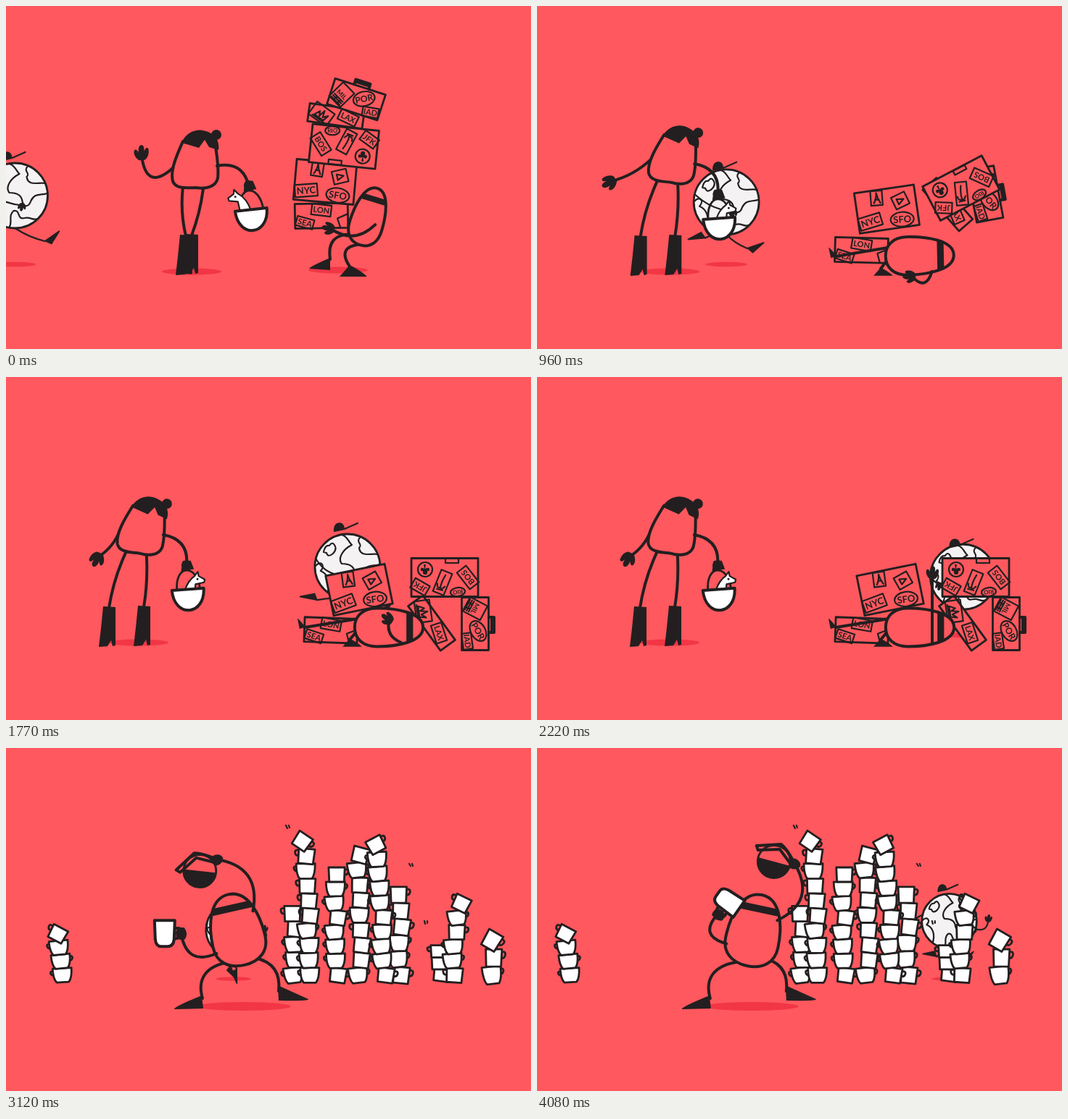
Recreate the animation shown at these times as an HTML page. Size 724x474 px, loop 4110 ms.

```html
<!DOCTYPE html>
<html lang="en">
<head>
<meta charset="utf-8">
<title>Running globe</title>
<style>
  html, body { margin: 0; width: 100%; height: 100%; overflow: hidden; background: #ff585e; }
  svg { display: block; width: 100%; height: 100%; }
  path, circle, rect { vector-effect: non-scaling-stroke; }
  .line { fill: none; stroke: #231f20; stroke-width: 4; stroke-linecap: round; stroke-linejoin: round; }
  .thin { stroke-width: 2.2; }
  .mid { stroke-width: 2.8; }
  .skin { fill: #ff585e; }
  .white { fill: #fff; }
  .ink { fill: #231f20; }
  .shadow { fill: #f23645; }
  text { font: 700 11px Lato, "Open Sans", sans-serif; fill: #231f20; text-anchor: middle; }
</style>
</head>
<body>
<svg viewBox="0 0 724 474" preserveAspectRatio="none">
  <defs>
    <path id="wave" class="ink" d="M-4,6C-9,2 -12,-5 -9,-9Q-6,-10 -4,-5Q-4,-15 1,-15Q5,-14 4,-6Q7,-13 10,-9C11,-2 8,4 4,6Z"/>
    <path id="boot" class="ink" d="M-8,-2L9,-1L9,52L5,53L3,45L-2,53L-14,54L-11,28Z"/>
    <path id="shoe" class="ink" d="M-1,-1L24,-1Q26,0 24,1L5,9Z"/>
    <g id="body">
      <path class="line skin" d="M0,-41C18,-41 23,-8 23,14C23,31 14,41 0,41C-14,41 -23,31 -23,14C-23,-8 -18,-41 0,-41Z"/>
      <path class="ink" d="M-16,-29L16,-29L18,-21L-18,-21Z"/>
    </g>
    <g id="mug">
      <path class="line mid" d="M11,-8q7,-2 6,4q-1,5 -6,4"/>
      <path class="line mid white" d="M-12,-12L12,-12L11,12L-11,12Z"/>
    </g>
    <g id="bowl">
      <path class="line mid" d="M13,-8q6,0 4,5q-2,4 -6,3"/>
      <path class="line mid white" d="M-14,-12L14,-12Q14,6 9,12L-9,12Q-14,6 -14,-12Z"/>
    </g>
  </defs>

  <g id="globe">
    <ellipse class="shadow" rx="29" ry="3.2"/>
    <g id="planet">
      <path id="leg0" class="line thin"/><path id="leg1" class="line thin"/>
      <use id="shoe0" href="#shoe"/><use id="shoe1" href="#shoe"/>
      <path id="armFront" class="line thin"/><use id="handFront" href="#wave"/>
      <circle r="45" class="line mid" style="fill:#f5f2f4"/>
      <path class="line thin" d="M-33,-20Q-31,-30 -25,-29Q-21,-35 -18,-30Q-14,-24 -20,-18Q-27,-12 -29,-19ZM-8,-44C0,-42 0,-36 6,-30C-6,-24 -14,-12 -8,-4C0,-4 9,-2 10,8C12,17 19,16 22,7C27,-4 36,0 44,-3M18,-41C10,-34 22,-31 16,-26C18,-12 32,-19 42,-17M-44,-1C-37,-9 -30,-2 -37,6C-27,10 -23,22 -27,35M-8,44C-3,36 -10,28 -2,21C8,19 2,34 13,31C22,29 24,35 31,32"/>
      <path id="armBack" class="line thin"/><use id="handBack" href="#wave"/>
      <g id="cap"><path class="ink" d="M-19,-49C-20,-64 -4,-64 -4,-52Z"/><path class="line thin" d="M-18,-49L-4,-52L14,-60"/></g>
    </g>
  </g>

  <g id="travel">
    <ellipse id="ladyShadow" class="shadow" cy="367" rx="41" ry="4.5"/>
    <path id="ladyLeg0" class="line"/><path id="ladyLeg1" class="line"/>
    <use id="boot0" href="#boot"/><use id="boot1" href="#boot"/>
    <path id="ladyArm0" class="line"/><use id="ladyHand" href="#wave"/>
    <g id="lady">
      <path class="line skin" d="M-18,-28C-26,-10 -36,12 -32,27C-28,39 -10,36 0,36C12,38 27,36 30,23C32,6 28,-12 26,-28"/>
      <path class="ink" d="M-20,-26C-14,-40 0,-47 14,-42C27,-38 33,-28 31,-16L18,-20L12,-30L4,-19Z"/>
      <circle class="ink" cx="28" cy="-37" r="7"/>
    </g>
    <path id="ladyArm1" class="line"/>
    <g id="basket">
      <path class="line mid" d="M-15,33C-16,-3 14,-3 17,33"/>
      <g id="dog">
        <path class="line thin white" d="M-15,34L-17,20L-29,18L-30,14L-22,9L-21,3L-16,9C-8,14 -3,22 0,34Z"/>
        <circle class="ink" cx="-20" cy="13" r="1.5"/>
      </g>
      <path class="line white" d="M-22,33L22,32C22,70 -20,72 -22,33Z"/>
      <circle class="ink" r="7" cy="-1"/><path class="ink" d="M-8,7L-5,-7L6,-7L10,5Z"/>
    </g>
    <ellipse class="shadow" id="porterShadow" cx="458" cy="365" rx="41" ry="4.5"/>
    <g id="cases"></g>
    <path id="porterLeg0" class="line"/><path id="porterLeg1" class="line"/>
    <path id="foot0" class="ink" d="M-29,13Q-28,10 0,-2L0,15Z"/>
    <path id="foot1" class="ink" d="M-14,14L0,-2Q16,6 24,14Z"/>
    <use id="porter" href="#body"/>
    <path id="porterArm" class="line"/><use id="porterHand" href="#wave"/>
  </g>

  <g id="coffee">
    <g id="stacks"></g>
    <path class="line thin" d="M385,107l2,4M389,107l1,3M555,160l2,3M559,160l1,3M576,239l1,4M580,239l0,3"/>
    <ellipse class="shadow" cx="327" cy="357" rx="65" ry="6"/>
    <path class="line" d="M270,346C262,318 276,301 306,296L342,290C366,295 378,310 375,336"/>
    <path class="ink" d="M231,361Q230,358 269,342L271,360ZM374,328L416,347Q418,350 375,349Z"/>
    <use id="drinker" href="#body"/>
    <path id="pourArm" class="line"/>
    <g id="pot">
      <circle class="line mid skin" r="22.5"/>
      <path id="liquid" class="ink" d="M-23,0A23,23 0 0 0 23,0Z"/>
      <path class="line" d="M-24,-22L10,-24Q18,-18 27,0M-24,-22L-22,-16L8,-17L22,2"/>
      <path class="ink" d="M20,3Q21,-6 30,-4Q38,0 36,7Q30,13 22,9Z"/>
    </g>
    <path id="stream" class="line" d="M211,192L205,246"/>
    <path id="cupArm" class="line"/>
    <g id="cup">
      <path class="line" d="M14,-7q11,-2 10,7q-2,8 -12,7"/>
      <path class="line white" d="M-14,-18L14,-18L13,8Q12,18 4,18L-5,18Q-12,18 -13,8Z"/>
      <path class="ink" d="M15,-2Q19,-10 27,-8Q33,0 28,8Q21,11 16,5Z"/>
    </g>
  </g>
</svg>
<script>
const LOOP = 4110, STEP = 30, CUT = 2340, TAU = 2 * Math.PI;
const $ = id => document.getElementById(id);
const clamp = (v, lo = 0, hi = 1) => Math.min(hi, Math.max(lo, v));
const part = (t, from, to) => clamp((t - from) / (to - from));
const ramp = (t, from, to) => { const p = part(t, from, to); return p * p * (3 - 2 * p); };
const mix = (a, b, p) => a.map((v, i) => v + (b[i] - v) * p);
const blend = (a, b, p) => a + (b - a) * p;
const show = (id, on) => { $(id).style.display = on ? '' : 'none'; };
const place = (id, x, y, r = 0, sx = 1, sy = sx) =>
  $(id).setAttribute('transform', `translate(${x} ${y}) rotate(${r}) scale(${sx} ${sy})`);

// World position of a point fixed to a part at [x, y, degrees]
function on([x, y, r], px, py) {
  const c = Math.cos(r * TAU / 360), s = Math.sin(r * TAU / 360);
  return [x + px * c - py * s, y + px * s + py * c];
}
// Limb from a to b, bent sideways by k
function limb(id, a, b, k) {
  const dx = b[0] - a[0], dy = b[1] - a[1], len = Math.hypot(dx, dy) || 1;
  const qx = (a[0] + b[0]) / 2 - dy / len * k, qy = (a[1] + b[1]) / 2 + dx / len * k;
  $(id).setAttribute('d', `M${a}Q${qx},${qy} ${b}`);
}

// Suitcases and their stickers
const tag = (x, y, w, h, r, inner) =>
  `<g transform="translate(${x} ${y}) rotate(${r})"><rect class="line thin" x="${-w / 2}" y="${-h / 2}" width="${w}" height="${h}"/>${inner}</g>`;
const oval = (x, y, rx, ry, r, inner) =>
  `<g transform="translate(${x} ${y}) rotate(${r})"><ellipse class="line thin" rx="${rx}" ry="${ry}"/>${inner}</g>`;
const word = (s, size = 11) => `<text y="${size * .36}" style="font-size:${size}px">${s}</text>`;
const sketch = d => `<path class="line thin" d="${d}"/>`;

// Listed from the bottom of the pile up; level is the place in the pile.
const CASES = [
  { id: 'lon', level: 0, w: 73, h: 34, from: [435, 290, -1], to: [448, 350, 2], art:
    tag(0, -8, 27, 15, 8, word('LON')) + tag(-23, 9, 24, 13, 16, word('SEA')) + sketch('M36,-2L22,4L26,17') },
  { id: 'nyc', level: 1, w: 83, h: 56, from: [440, 243, 5], to: [487, 294, -11.5], art:
    tag(-12, -17, 16, 20, 4, sketch('M-4,7Q0,0 0,-7Q1,0 5,7M-2,2L3,2')) + tag(-25, 14, 31, 17, -9, word('NYC', 13)) +
    tag(20, -9, 20, 18, -18, sketch('M-4,-4L5,0L-4,4Z')) + oval(19, 17, 16, 10, 4, word('SFO', 13)) },
  { id: 'lax', level: 3, w: 76, h: 25, from: [455, 152, 8], to: [587, 340, 54], art:
    tag(-20, 0, 30, 21, 28, sketch('M-8,6L-4,-2L-1,4L1,-6L4,3L9,-3L7,6ZM-10,8L11,8')) + tag(17, 0, 26, 15, 18, word('LAX')) },
  { id: 'por', level: 4, w: 73, h: 37, from: [483, 129, 18], to: [647, 341, 90], art:
    '<path class="line" d="M-9,-19L-9,-26L12,-26L12,-19M-7,-23L10,-23"/>' +
    tag(-21, 0, 22, 27, 28, word('MIL', 9) + sketch('M-8,6L8,6M-8,9L8,9M-8,12L8,12M-3,6L-3,12M4,6L4,12')) +
    oval(10, -4, 15, 10, -30, word('POR', 12)) + tag(24, 11, 22, 13, -8, word('IAD')) },
  { id: 'bos', level: 2, w: 92, h: 53, from: [466, 194, 6], to: [605, 277, 180], art:
    oval(-18, -20, 10, 6, -6, word('RIO', 8)) + tag(-32, 0, 29, 16, 52, word('BOS')) +
    tag(3, -7, 16, 32, 22, sketch('M0,11Q2,0 0,-8M-5,-4Q-3,-10 0,-8Q5,-10 6,-4M-4,-10L4,-11')) +
    tag(34, -13, 23, 15, 30, word('JFK')) +
    oval(27, 11, 10, 10, 0, '<path class="ink" d="M-1,7L0,1Q-6,4 -6,0Q-6,-3 -3,-2Q-4,-7 0,-7Q4,-7 3,-2Q7,-3 6,1Q5,4 1,1L2,7Z"/>') +
    tag(-10, 23, 18, 6, 0, '') }
];
$('cases').innerHTML = CASES.map(({ id, w, h, art }) =>
  `<g id="${id}"><rect class="line mid skin" x="${-w / 2}" y="${-h / 2}" width="${w}" height="${h}"/>${art}</g>`).join('');

// The pile leans more the higher a case sits, then everything tumbles.
function tumble({ id, level, from, to }, t) {
  const lean = part(t, 0, 480), fall = part(t, 480, 1020 + level * 20);
  const x = from[0] + (8 + 7 * level) * lean;
  const y = from[1] + level * level * .6 * lean;
  const r = from[2] + 6.5 * level * lean;
  place(id, blend(x, to[0], fall), blend(y, to[1], fall * fall), blend(r, to[2], fall));
}

// Seeded cup tower from the floor to a given height; bends and tilts towards its top
function tower(x, top, bend = 0, tilt = 0) {
  const floor = 314, count = Math.round((floor - top) / 20.5), gap = (floor - top) / count;
  let cups = '';
  for (let i = 0; i <= count; i++) {
    const n = Math.abs(Math.sin(x * 12.9 + i * 78.2)) * 1000 % 1;
    const last = i === count;
    const cx = x + bend * (i / count) ** 2 + (n - .5) * 6;
    const r = last ? tilt : (n - .5) * 16;
    const side = n * 7 % 1 > .45 ? 1 : -1;
    cups += `<use href="#${last || n > .5 ? 'mug' : 'bowl'}" transform="translate(${cx} ${floor - gap * i}) rotate(${r}) scale(${side * .93} ${(gap + 1) / 25})"/>`;
  }
  return cups;
}
$('stacks').innerHTML =
  tower(398, 229, -3) + tower(542, 203) + tower(597, 281) + tower(78, 257, -9, 28) +
  tower(418, 129, -9, 34) + tower(454, 175) + tower(487, 148, -2, 15) +
  tower(520, 134, -10, -28) + tower(616, 215, 12, 26) + tower(672, 266, -3, 30);

// Run cycle: one stride holds two steps.
function run(x, ground, size, stride) {
  const swing = Math.sin(TAU * stride) ** 2;
  const bob = 15 * Math.max(0, Math.cos(TAU * (2 * stride - .75)));
  place('globe', x, ground, 0, size);
  place('planet', 0, bob - 95);
  place('cap', 0, bob * .55);
  for (const i of [0, 1]) {
    const a = TAU * (stride + i / 2);
    const foot = [42 * Math.cos(a - 1.07), 58 + 9 * Math.cos(a - 1.26) - 4 * Math.cos(2 * a - 2.5)];
    limb('leg' + i, [0, 45], foot, 4);
    place('shoe' + i, ...foot, 78 - 113 * clamp(1.6 * Math.cos(a - .88), -1, 1));
  }
  const back = mix([-58, 9], [17, 14], swing), front = mix([64, -2], [25, 6], swing);
  limb('armBack', [-43, -10], back, 10);
  limb('armFront', [43, 13], front, 16);
  place('handBack', ...back, 190, .55);
  place('handFront', ...front, 8, .6);
}

function drawLady(t) {
  const go = ramp(t, 0, 1000), late = ramp(t, 100, 1000), drop = ramp(t, 560, 950);
  const body = mix([262, 215, 0], [189, 208, 8], go);
  place('lady', ...body);
  $('ladyShadow').setAttribute('cx', body[0] - 6);

  // Waves, then lowers the arm with one wide swing
  const wave = (1 - Math.cos(TAU * t / 320)) / 2;
  const swing = Math.exp(-(((t - 1040) / 180) ** 2));
  const up = [-44 + 18 * wave, -16 - 6 * wave, -4 + 14 * wave];
  const [hx, hy, hr] = mix(up, [-30 - 30 * swing, 37 - 8 * swing, -155 + 40 * swing], drop);
  const shoulder = on(body, -31, 8), hand = [shoulder[0] + hx, shoulder[1] + hy];
  limb('ladyArm0', shoulder, hand, blend(-45, -8, drop));
  place('ladyHand', ...hand, hr);

  const basket = mix([335, 249, -5], [249, 261, -3], go);
  limb('ladyArm1', on(body, 29, 6), basket.slice(0, 2), -25);
  place('basket', ...basket);
  if (t < 750) place('dog', 0, 4 * go); else place('dog', -6, 6, 0, -1, 1);

  const feet = [mix([248, 318], [142, 319], late), mix([256, 317], [190, 318], go)];
  [on(body, -18, 35), on(body, 10, 37)].forEach((hip, i) => {
    limb('ladyLeg' + i, hip, feet[i], 6 - 10 * i);
    place('boot' + i, ...feet[i]);
  });
}

function drawPorter(t) {
  const lean = part(t, 0, 480), fall = ramp(t, 480, 1000), raise = ramp(t, 1600, 2000);
  const body = mix([500 + 11 * lean, 291 - 2 * lean, 17], [528, 346, 90], fall);
  place('porter', ...body, blend(1, 1.15, fall));
  const feet = [mix([447, 350, 5 * lean], [412, 346, 75], fall), mix([474, 360, 0], [474, 363, 0], fall)];
  [on(body, -14, 30), on(body, 0, 40)].forEach((hip, i) => {
    limb('porterLeg' + i, hip, feet[i].slice(0, 2), 28 * (1 - fall));
    place('foot' + i, ...feet[i], 1 - (.5 - .2 * i) * fall);
  });
  const shoulder = mix(on(body, 12, 8), [545, 367], fall);
  const held = mix([448 + 10 * lean, 308 - 3 * lean, -80], [518, 375, -95], fall);
  const [x, y, r] = mix(held, [545, 274, 4], raise);
  limb('porterArm', shoulder, [x, y], -25 * (1 - raise));
  place('porterHand', x, y, r, .85);
  show('porterShadow', t < 900);
}

function travel(t) {
  run(12.5 + t * .259, 357, 1, (t - 480) / 600);
  drawLady(t);
  CASES.forEach(c => tumble(c, t));
  drawPorter(t);
}

// Eases in from the left, drifts, and speeds away at the end
function slide(t) {
  const lead = 1 - part(t, CUT, 2700), exit = part(t, 3840, LOOP);
  return 2 * part(t, 2760, 3500) - 24 * lead * lead - 42 * exit * exit;
}

function coffee(t) {
  const lift = ramp(t, 2900, 3400), sip = ramp(t, 3600, 4060);
  const pose = (pour, raised, drink) => mix(mix(pour, raised, lift), drink, sip);
  const dx = slide(t);
  place('coffee', dx, 0);
  run(205 + (t - 2760) * .299 + dx, 319, .84, (t - 4080) / 600);

  const body = pose([313, 254, -19], [322, 247, -4], [331, 252, 12]);
  place('drinker', ...body, 1.6, 1.22);
  const pot = pose([240, 184, -55], [304, 150, -18], [358, 157, 0]);
  place('pot', ...pot);
  place('liquid', 0, 0, 15 * lift - pot[2]);
  limb('pourArm', on(body, 28, -20), on(pot, 28, 2), 45);
  const cup = pose([208, 260, 0], [232, 251, 0], [295, 212, 125]);
  place('cup', ...cup);
  limb('cupArm', on(body, -34, 26), on(cup, 23, 2), -34);
  show('stream', t < 2940);
}

function draw(now) {
  const ms = now % LOOP;
  const t = ms < 2 * STEP ? 0 : Math.floor(ms / STEP) * STEP;
  const first = t < CUT;
  show('travel', first);
  show('coffee', !first);
  (first ? travel : coffee)(t);
}

const start = performance.now();
function tick() {
  draw(performance.now() - start);
  requestAnimationFrame(tick);
}
tick();
</script>
</body>
</html>
```
